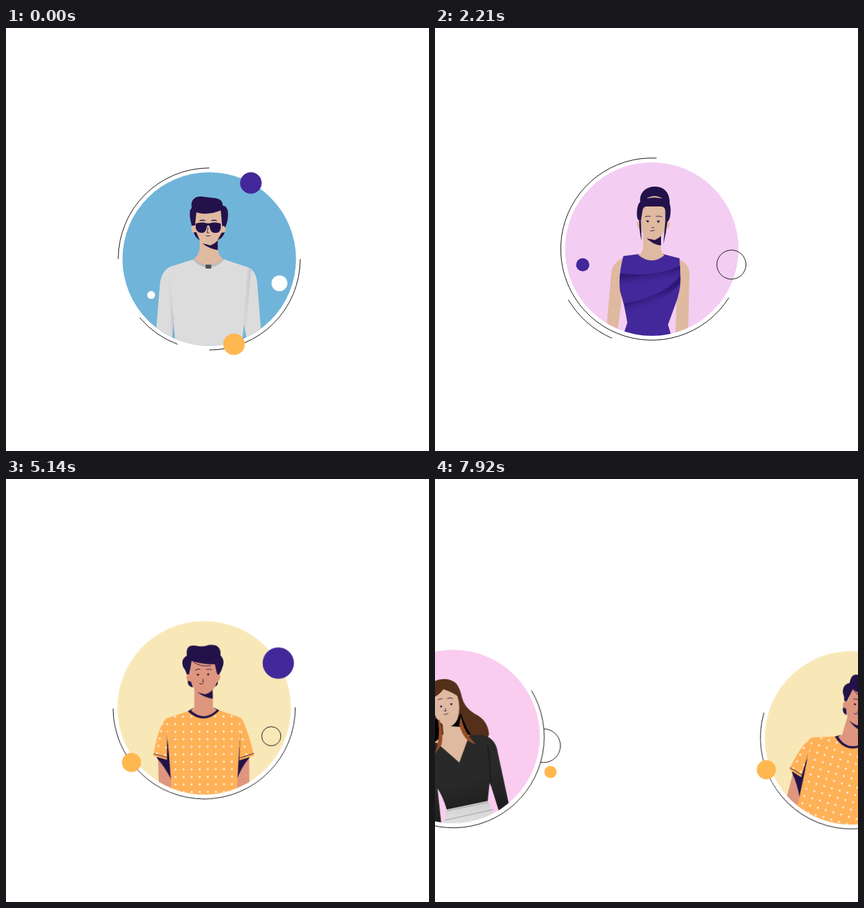
Recreate the animation shown at these times as an HTML page without scripts. Size 640 px wide and 640 px high, loop 8000 ms.

```html
<!DOCTYPE html>
<html lang="en">
<head>
<meta charset="utf-8">
<title>Portrait wheel</title>
<style>
html, body { margin: 0; width: 100%; height: 100%; overflow: hidden; background: #fff; }
svg { display: block; width: 100vw; height: 100vh; }

/* All portraits sit on one large wheel whose hub is below the stage. */
#wheel { transform-origin: 307.5px 1515px; animation: turn 8s infinite; }
@keyframes turn {
  0%        { transform: rotate(0deg); animation-timing-function: linear; }
  6.1875%   { transform: rotate(0deg); animation-timing-function: cubic-bezier(.6, 0, .5, .385); }
  10.625%   { transform: rotate(12.1deg); animation-timing-function: cubic-bezier(.333, .5, .667, .833); }
  16%       { transform: rotate(24.15deg); animation-timing-function: cubic-bezier(.333, .5, .667, .833); }
  20.5%     { transform: rotate(27.18deg); animation-timing-function: cubic-bezier(.333, .667, .667, 1); }
  27.8%     { transform: rotate(28.45deg); animation-timing-function: linear; }
  49.9375%  { transform: rotate(28.45deg); animation-timing-function: cubic-bezier(.6, 0, .5, .385); }
  54.375%   { transform: rotate(40.8deg); animation-timing-function: cubic-bezier(.333, .5, .667, .833); }
  59.75%    { transform: rotate(52.85deg); animation-timing-function: cubic-bezier(.333, .5, .667, .833); }
  64.25%    { transform: rotate(56.08deg); animation-timing-function: cubic-bezier(.333, .667, .667, 1); }
  72.2%     { transform: rotate(57.45deg); animation-timing-function: linear; }
  93.6875%  { transform: rotate(57.45deg); animation-timing-function: cubic-bezier(.6, 0, .5, .385); }
  98.125%   { transform: rotate(69.6deg); animation-timing-function: linear; }
  100%      { transform: rotate(75.7deg); }
}

.ring { fill: none; stroke: #111; stroke-width: 1; }
.ink { fill: #231249; }
.line { fill: none; stroke: #231249; stroke-width: 1.3; stroke-linecap: round; }
.thin { stroke-width: .9; }
.violet { fill: #42289a; }
.amber { fill: #ffb750; }
.fair { fill: #dfb9a0; }
.tan { fill: #de967f; }
.grey { fill: #dcdcdc; }
.white { fill: #fff; }
</style>
</head>
<body>
<svg viewBox="0 0 640 640" xmlns="http://www.w3.org/2000/svg">
  <defs>
    <clipPath id="clipGlasses"><circle cx="307.5" cy="349.5" r="131.3"/></clipPath>
    <clipPath id="clipBun"><circle cx="328" cy="334.5" r="131.3"/></clipPath>
    <clipPath id="clipDots"><circle cx="333" cy="346.5" r="131.3"/></clipPath>
    <clipPath id="clipLong"><circle cx="27.5" cy="389.5" r="131.3"/></clipPath>
    <pattern id="dots" width="12.2" height="11.4" patternUnits="userSpaceOnUse"
             patternTransform="translate(282.5 364.3) rotate(1.3)">
      <circle class="white" cx="6.1" cy="5.7" r="1.4"/>
    </pattern>
    <pattern id="dotsLeft" href="#dots" patternTransform="translate(259.7 384.2) rotate(12)"/>
    <pattern id="dotsRight" href="#dots" patternTransform="translate(382.9 391.7) rotate(-12)"/>
    <linearGradient id="foldTop" gradientUnits="userSpaceOnUse" x1="320" y1="370" x2="323" y2="388">
      <stop stop-color="#2c1875"/><stop offset="1" stop-color="#42289a" stop-opacity="0"/>
    </linearGradient>
    <linearGradient id="foldLow" gradientUnits="userSpaceOnUse" x1="300" y1="412" x2="306" y2="430">
      <stop stop-color="#2c1875"/><stop offset="1" stop-color="#42289a" stop-opacity="0"/>
    </linearGradient>
    <linearGradient id="seam">
      <stop stop-color="#dcdcdc"/><stop offset="1" stop-color="#c6c6cd"/>
    </linearGradient>
    <linearGradient id="skirt" x2="0" y2="1">
      <stop stop-color="#cfcfcf"/><stop offset="1" stop-color="#e4e4e4"/>
    </linearGradient>
    <linearGradient id="blouse" x2=".3" y2="1">
      <stop offset=".6" stop-color="#292929"/><stop offset="1" stop-color="#1d1d1d"/>
    </linearGradient>
  </defs>

  <g id="wheel">
    <!-- Man with sunglasses -->
    <g>
      <circle cx="307.5" cy="349.5" r="131.3" fill="#71b4d9"/>
      <g clip-path="url(#clipGlasses)">
        <path class="grey" d="M225 485C229 440 231 405 233.500 383Q237 366 249 361L284 350H330L366 362Q378 367 380 385L388 485Z"/>
        <path fill="url(#seam)" d="M246 374L250.500 472H254L254 440Q249 405 248 376Z"/>
        <path fill="url(#seam)" d="M366 364L358 448L361 468Q367 410 371 366Z"/>
        <path fill="#71b4d9" d="M253.500 446L250.500 485H257ZM360 448L356 485L364 470Z"/>
        <path fill="#b9bbc1" d="M283 351L292 345H321L330 351Q306 374 283 351Z"/>
        <path class="fair" d="M293 316V334Q291 345 284 349.500Q306 367 329 350Q321 344 320.500 334V316Z"/>
        <rect x="302" y="358" width="8.500" height="6" fill="#55504f"/>
        <path class="ink" d="M297 326Q308 334 320.500 336V319Q309 330 297 326Z"/>
        <g class="fair">
          <ellipse cx="284.500" cy="304" rx="4" ry="6"/><ellipse cx="329" cy="304" rx="3.500" ry="6"/>
          <path d="M286 275H328V300Q327 322 309 329Q291 325 286 304Z"/>
        </g>
        <path class="ink" d="M281 272C279 262 284 254 296 255L317 257.500Q328 259 328 268.500Q336 270 336 281Q336 293 331.500 302Q330 298 327 300L325 276Q305 284 288 279L286 299L281 299Q277 285 278.500 276Z
          M284 309H288L293 321Q286 317 284 309ZM331 309L326 310L320 321Q328 318 331 309Z"/>
        <path class="ink" d="M287 296Q295 293 304 295.500H308Q317 293 325 296V302Q324 310 318 310Q309 311 308 300Q306 297 304 300Q303 310 296 310Q288 309 287 302Z"/>
        <path class="line" d="M293.500 291.500Q297 290 301 291.500M311 291.500Q315 290 318.500 291.500"/>
        <path class="line thin" d="M305.500 302L304.500 310H307M303 314.500H309"/>
      </g>
      <path class="ring" d="M169.800 349.500A137.700 137.700 0 0 1 307.500 211.800M445.200 349.500A137.700 137.700 0 0 1 307.500 487.200M202.300 438.300A137.700 137.700 0 0 0 259.500 478.500"/>
      <circle class="violet" cx="370.500" cy="234.500" r="16.300"/>
      <circle class="white" cx="413.700" cy="386.300" r="12"/>
      <circle class="white" cx="219.600" cy="404" r="6"/>
      <circle class="amber" cx="345" cy="478.500" r="16.300"/>
    </g>

    <!-- Woman with a bun -->
    <g transform="rotate(-28.45 307.5 1515)">
      <circle cx="328" cy="334.500" r="131.3" fill="#f4cdf2"/>
      <g clip-path="url(#clipBun)">
        <path class="fair" d="M286 347Q268 355 266.500 372L259 460H276L285 390ZM368 350Q384 355 385 372L383 462H364L366 400Z"/>
        <path class="violet" d="M285 345L309 342H345L370 348.500L371.500 378Q372 398 363 420L352.500 449L359 470H283L291 446Q287 420 280 398Q277 375 285 345Z"/>
        <path fill="url(#foldTop)" d="M280 371Q330 378 371 360V374Q335 388 279.500 388Z"/>
        <path fill="url(#foldLow)" d="M371 374Q352 404 286.500 417L290 434Q345 418 371 386Z"/>
        <path class="fair" d="M315 308V333Q314 341 307 343Q328 360 347 344Q342 341 342 333V312Z"/>
        <path class="ink" d="M320 318Q330 328 342 329V314Q333 323 320 318Z"/>
        <g class="fair">
          <ellipse cx="308.500" cy="297" rx="3" ry="6.500"/><ellipse cx="352" cy="297" rx="3" ry="6.500"/>
          <path d="M312 268H350V298Q348 314 332 321Q316 316 312 306Z"/>
        </g>
        <path class="ink" d="M310.500 263C309 248 320 240 333 240C347 240 356 250 355 266Q357.500 272 356 283Q355 291 351.500 293Q350 310 345.500 327L348.500 292V277Q348 270 342 270H320Q315 270 314 276L311.500 292L312.500 322Q308.500 305 309 291Q305 290 305.500 279Q306 267 310.500 263Z"/>
        <path class="fair" d="M320 258Q332 250.500 344 258Q332 255 320 258Z"/>
        <path class="line thin" d="M318 285.500Q322 284 326 285M335 285Q339 284 343 285.500M328 302H331M326 307Q329 307.500 332 306M320 291.500L323 292M336 292L340 292"/>
        <circle class="ink" cx="322" cy="292.500" r="1.500"/><circle class="ink" cx="338" cy="293" r="1.500"/>
      </g>
      <path class="ring" d="M335.200 196.900A137.800 137.800 0 1 0 444.500 408.200M201.700 411.200A147.700 147.700 0 0 0 267.500 469.300"/>
      <circle class="violet" cx="223.500" cy="358.200" r="10"/>
      <circle class="ring" cx="448.500" cy="358" r="22"/>
    </g>

    <!-- Man in a dotted shirt -->
    <g transform="rotate(-57.71 307.5 1515)">
      <circle cx="333" cy="346.500" r="131.3" fill="#f9e8b7"/>
      <g clip-path="url(#clipDots)">
        <path class="tan" d="M261 418V470H284L278 420ZM399 422L398 470H376L383 424Z"/>
        <path class="ink" d="M259 420L275 378L282 458Q272 435 259 420ZM400 423L387 382L378 460Q386 438 400 423Z"/>
        <path fill="#ffb158" d="M308 351H356L388 363Q397 376 406.500 421L384 427.500L386.500 384L378 482H281L276 380L274.500 423.500L254 417Q262 374 275 361Z"/>
        <path fill="url(#dots)" d="M308 351H356L388 363L378 482H281L275 361Z"/>
        <path fill="url(#dotsLeft)" d="M275 361V422L254 417Q262 374 275 361Z"/>
        <path fill="url(#dotsRight)" d="M388 363Q397 376 406.500 421L385 427Z"/>
        <path class="line thin" d="M255 414L275 420M385 424L406 417.500"/>
        <path class="tan" d="M319 312L318 347L312 350Q332 370 353 350L346.500 347V314Z"/>
        <path class="ink" d="M308 351L318 345.500L313 350Q332 368 352 350.500L346.500 346L356 351Q332 374 308 351ZM323 322Q333 331 346.500 333V316Q336 329 323 322Z"/>
        <g class="tan">
          <ellipse cx="311.500" cy="300" rx="4" ry="6.500"/><ellipse cx="355" cy="300" rx="3.500" ry="6.500"/>
          <path d="M314 272H353L354.500 298Q354 320 336 326Q318 324 313.500 304Z"/>
        </g>
        <path class="ink" d="M309 267C308 254 313 251 322 252Q333 255 343 251.500Q362 250 360 268Q366 274 363.500 283Q361 291 357 297L354 296L351 281Q333 281 316 275L312 295H308Q307 289 303 284Q299 272 309 267ZM309 305L314 306L317 315Q309 314 309 305ZM354.500 306L350 315Q356 313 354.500 306Z"/>
        <path class="line thin" d="M318 276Q328 285 345 283M321 289Q325 287 328.500 288M338 288.500Q342 287.500 346 289M332 303L333 306.500L331 307M327 309.500Q330 312 333 308.500"/>
        <circle class="ink" cx="325" cy="296" r="1.600"/><circle class="ink" cx="340.500" cy="296" r="1.600"/>
      </g>
      <path class="ring" d="M195.200 343.500A137.800 137.800 0 1 0 470.800 349.500"/>
      <circle class="violet" cx="447" cy="282" r="23.700"/>
      <circle class="ring" cx="433.300" cy="392.300" r="14.500"/>
      <circle class="amber" cx="220.700" cy="426" r="14.500"/>
    </g>

    <!-- Woman with long hair -->
    <g transform="rotate(-72.5 307.5 1515)">
      <circle class="ring" cx="164.500" cy="403.500" r="25.500"/>
      <circle class="white" cx="27.500" cy="389.500" r="137.800"/>
      <circle cx="27.500" cy="389.500" r="131.3" fill="#f9ccf0"/>
      <g clip-path="url(#clipLong)">
        <path fill="#54301b" d="M-14 345Q-18 312 4 304Q22 299 33 310Q38 317 41 330Q44 345 60 355Q80 364 82 386L78 398L10 402L-24 405Q-10 385 -14 345Z"/>
        <path d="M14 372Q32 374 39 354L48 376L56 390H12Z"/>
        <path class="fair" d="M11 362L13 386L-4 402L37 431L54 388Q42 386 39 375L24 374Z"/>
        <path d="M-8 362L8 364L10 390L-6 402Z"/>
        <path class="fair" d="M-5 332Q8 326 13 318Q25 322 34 328Q40 345 34 364Q28 376 18 374Q3 369 -2 350Z"/>
        <path fill="url(#skirt)" d="M18 499L80 486L98 530H12Z"/>
        <path d="M16 516L89 500M18 502L81 489" fill="none" stroke="#8f8f8f" stroke-width=".8"/>
        <path fill="url(#blouse)" d="M-30 400L3 399L37 429L52 388L70 387Q89 390 94 408L112 492L97 503L83 458L80 487L18 500Q12 480 4 468L10 524H-25Z"/>
        <path d="M80 402Q86 430 83 462M80 402L85 464" fill="none" stroke="#1a1a1a"/>
        <path fill="#964d22" d="M7 364Q14 386 10 402L0 416Q9 392 5 366ZM39 358Q44 384 62 401Q44 398 37 372Z"/>
        <path class="line thin" d="M5 334L11 332M19 332Q23 330 27 332M16 347L17 351H14M14 356Q18 357 20 354"/>
        <circle class="ink" cx="9.500" cy="344" r="1.500"/><circle class="ink" cx="25" cy="340.500" r="1.500"/>
      </g>
      <path class="ring" d="M146.300 320.200A137.500 137.500 0 0 1 -70 486.700"/>
      <circle class="amber" cx="175" cy="443.300" r="9.200"/>
    </g>
  </g>
</svg>
</body>
</html>
```
